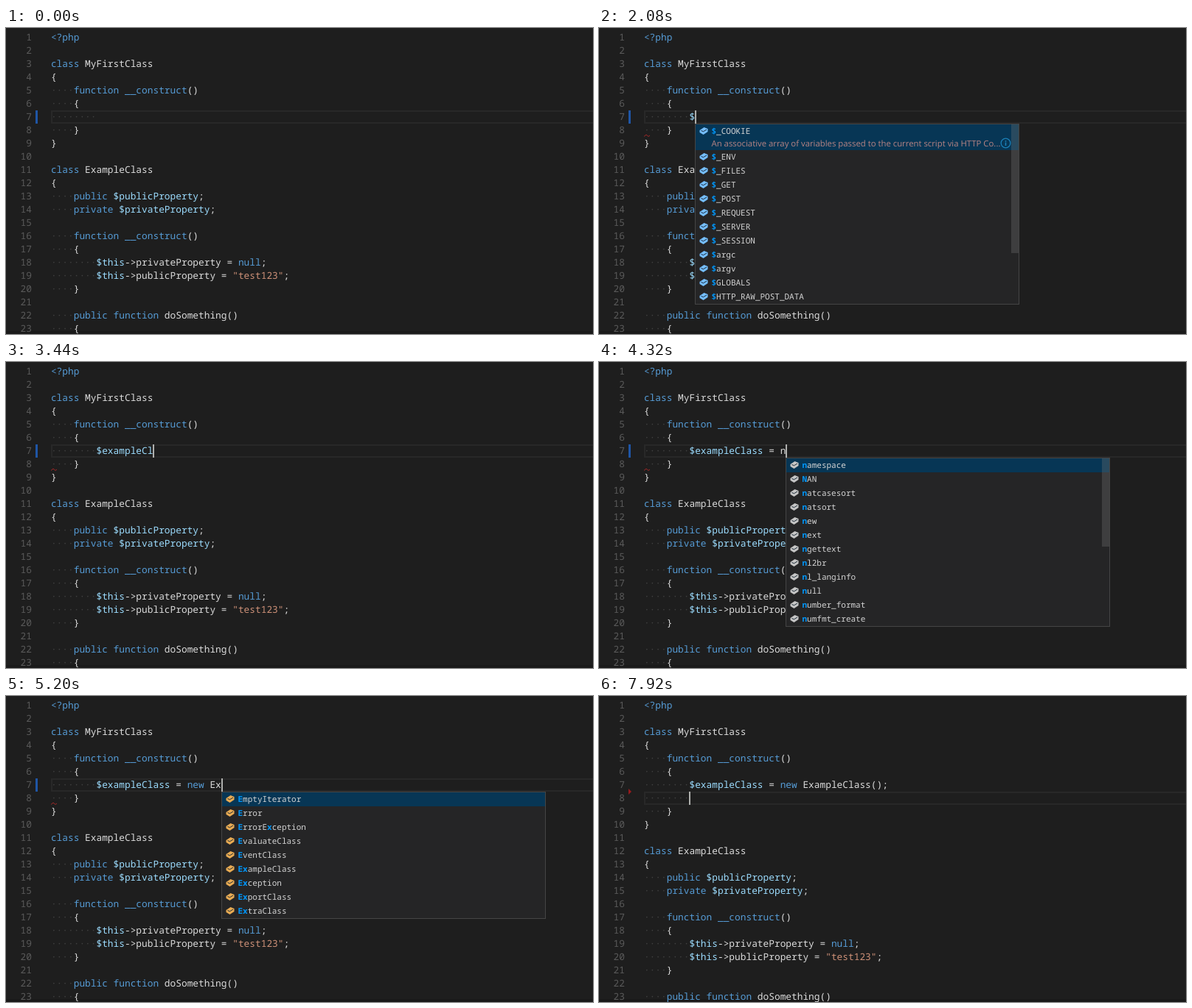
Recreate the animation shown at these times as an HTML page with a canvas. Size 796 by 416 pixels, loop 8000 ms.

```html
<!DOCTYPE html>
<html lang="en">
<head>
<meta charset="utf-8">
<title>Code completion</title>
<style>
  html, body { margin: 0; width: 100%; height: 100%; overflow: hidden; background: #1e1e1e; }
  canvas { display: block; }
</style>
</head>
<body>
<canvas id="stage" width="796" height="416"></canvas>
<script>
const ctx = document.getElementById('stage').getContext('2d');
const LOOP = 8000;
const LEFT = 60.9, CHAR = 7.697, LINE = 18, TOP = 4;
const MONO = '"Noto Sans Mono", "DejaVu Sans Mono", monospace';
const CODE = '12.83px ' + MONO;
const LABEL = '11px ' + MONO, LABEL_CHAR = 6.6;
const DOC = '11.35px "Open Sans", "Noto Sans", sans-serif';
const PLAIN = '#dcdcdc', KEYWORD = '#569cd6', VARIABLE = '#9cdcfe', STRING = '#ce9178';

const before = `<?php

class MyFirstClass
{
    function __construct()
    {`.split('\n');
const after = `    }
}

class ExampleClass
{
    public $publicProperty;
    private $privateProperty;

    function __construct()
    {
        $this->privateProperty = null;
        $this->publicProperty = "test123";
    }

    public function doSomething()
    {`.split('\n');
const typed = '$exampleClass = new ExampleClass();';

const lists = {
  vars: {
    icon: '#75beff', slider: 175,
    doc: 'An associative array of variables passed to the current script via HTTP Co...',
    items: ('$_COOKIE $_ENV $_FILES $_GET $_POST $_REQUEST $_SERVER $_SESSION ' +
      '$argc $argv $GLOBALS $HTTP_RAW_POST_DATA').split(' ')
  },
  env: {
    icon: '#75beff', items: ['$_ENV'],
    doc: 'An associative array of variables passed to the current script via the env...'
  },
  n: {
    icon: '#c5c5c5', slider: 120,
    items: ('namespace NAN natcasesort natsort new next ngettext nl2br ' +
      'nl_langinfo null number_format numfmt_create').split(' ')
  },
  ne: { icon: '#c5c5c5', items: ['new', 'next'] },
  new: { icon: '#c5c5c5', items: ['new'] },
  classes: {
    icon: '#e8ab53',
    items: ('EmptyIterator Error ErrorException EvaluateClass EventClass ' +
      'ExampleClass Exception ExportClass ExtraClass').split(' ')
  },
  example: { icon: '#e8ab53', items: ['ExampleClass'] }
};

// start time, characters typed, cursor visible, open list
const steps = [
  [0, 0, 0], [240, 0, 1], [720, 0, 0],
  [1120, 1, 1, 'vars'], [1360, 2, 1, 'vars'], [1440, 3, 1, 'env'], [1920, 2, 1, 'env'],
  [2080, 1, 1, 'vars'], [2160, 2, 1, 'vars'], [2240, 2, 1, 'env'],
  [2400, 3, 1], [2480, 4, 1], [2560, 5, 1],
  [2800, 6, 1], [2880, 7, 1], [2960, 8, 1], [3280, 9, 1],
  [3440, 10, 1], [3520, 11, 1], [3600, 12, 1], [3760, 13, 1], [3840, 14, 1],
  [4000, 15, 1], [4080, 16, 1],
  [4320, 17, 1, 'n'], [4400, 18, 1, 'ne'], [4480, 19, 1, 'new'], [4560, 20, 1],
  [4800, 21, 1, 'classes'], [5200, 22, 1, 'classes'], [5280, 22, 1, 'example'],
  [5680, 22, 0, 'example'],
  [6080, 32, 1], [6560, 32, 0], [6720, 33, 1], [6800, 34, 1],
  [7040, 35, 1], [7520, 35, 0], [7920, 35, 1]
];

const colX = col => LEFT + col * CHAR;
const lineY = line => TOP + (line - 1) * LINE;

function rect(x, y, w, h, color) {
  ctx.fillStyle = color;
  ctx.fillRect(x, y, w, h);
}

function frame(x, y, w, h, color, width = 1) {
  ctx.strokeStyle = color;
  ctx.lineWidth = width;
  ctx.strokeRect(x + width / 2, y + width / 2, w - width, h - width);
}

function text(str, x, y, color, font = CODE, align = 'left') {
  ctx.font = font;
  ctx.textAlign = align;
  ctx.fillStyle = color;
  ctx.fillText(str, x, y);
}

function shape(points, color) {
  ctx.fillStyle = color;
  ctx.beginPath();
  points.forEach(([x, y]) => ctx.lineTo(x, y));
  ctx.fill();
}

function tokenColor(token) {
  if (token[0] === '"') return STRING;
  if (token[0] === '$') return VARIABLE;
  return /^(<\?php|class|function|__construct|public|private|null|new)$/.test(token) ? KEYWORD : PLAIN;
}

function drawLine(str, line) {
  const y = lineY(line) + 13;
  for (const { 0: run, index } of str.matchAll(/^ +| +$/g))
    for (let i = 0; i < run.length; i++) text('·', colX(index + i), y, '#414141');
  for (const { 0: token, index } of str.matchAll(/"[^"]*"|<\?php|\$\w*|\w+|[^\s\w$"]+/g))
    text(token, colX(index), y, tokenColor(token));
}

function drawSquiggle(x, y) {
  ctx.strokeStyle = '#a02828';
  ctx.lineWidth = 1;
  ctx.beginPath();
  ctx.moveTo(x, y + 2.5);
  ctx.lineTo(x + 3, y);
  ctx.lineTo(x + 6, y + 2.5);
  ctx.lineTo(x + 8, y + 1);
  ctx.stroke();
}

function drawIcon(x, y, color) {
  shape([[x, y - 1], [x + 6, y - 5], [x + 11, y - 3], [x + 11, y + 1], [x + 5, y + 5], [x, y + 2]], color);
  ctx.strokeStyle = '#1e2c38';
  ctx.lineWidth = 1;
  ctx.beginPath();
  ctx.moveTo(x + 2, y - 0.5);
  ctx.lineTo(x + 5, y + 0.8);
  ctx.lineTo(x + 9.5, y - 2);
  ctx.stroke();
}

function drawInfo(x, y) {
  ctx.strokeStyle = '#1b80b8';
  ctx.lineWidth = 1.3;
  ctx.beginPath();
  ctx.arc(x, y, 6.3, 0, 7);
  ctx.stroke();
  rect(x - 0.8, y - 3.5, 1.6, 1.6, '#1b80b8');
  rect(x - 0.8, y - 1, 1.6, 4.5, '#1b80b8');
}

// Letters of the query are picked out in order within the label.
function drawLabel(label, query, x, y) {
  let hit = 0;
  [...label].forEach((ch, i) => {
    const match = hit < query.length && ch.toLowerCase() === query[hit].toLowerCase();
    if (match) hit++;
    text(ch, x + i * LABEL_CHAR, y, match ? '#0097fb' : '#d4d4d4', (match ? 'bold ' : '') + LABEL);
  });
}

function drawList({ items, doc, icon, slider }, query, x, y) {
  const first = doc ? 35 : 19;
  const height = first + (items.length - 1) * 19 + 2;
  rect(x, y, 440, height, '#252526');
  rect(x + 1, y + 1, 438, first, '#073655');
  items.forEach((label, i) => {
    const mid = y + 10 + (i ? first + (i - 1) * 19 : 0);
    drawIcon(x + 6.5, mid, icon);
    drawLabel(label, query, x + 22.5, mid + 4);
  });
  if (doc) {
    text(doc, x + 22.5, y + 31, '#b88484', DOC);
    drawInfo(x + 421.5, y + 26.5);
  }
  if (slider) rect(x + 429, y + 1, 10, slider, 'rgba(121,121,121,.3)');
  frame(x, y, 440, height, '#454545');
}

function draw(t) {
  const [, count, cursor, list] = steps.findLast(step => step[0] <= t);
  const newline = t >= 7920;
  const row = newline ? 8 : 7;
  const col = 8 + (newline ? 0 : count);
  const indent = ' '.repeat(8);
  // The closing bracket is inserted together with the opening one.
  const entry = typed.slice(0, count === 33 ? 34 : count);
  const lines = [...before, indent + entry, ...(newline ? [indent] : []), ...after];

  rect(0, 0, 796, 416, '#1e1e1e');
  rect(0, 412, 796, 4, '#1a1a1a');
  frame(61, lineY(row), 760, LINE, '#282828', 2);

  if (t < 7360) rect(40, lineY(7), 3, LINE, '#1f55a5');
  else shape([[40, 126], [44, 130], [40, 134]], '#971a1d');

  if (count === 33 || count === 34)
    for (const c of [40, 41]) frame(Math.round(colX(c)), lineY(7), 8, LINE, '#777');

  lines.slice(0, 23).forEach((str, i) => {
    text(i + 1, 35, lineY(i + 1) + 13, '#5a5a5a', CODE, 'right');
    drawLine(str, i + 1);
  });

  if (t >= 1440 && t < 7280) drawSquiggle(61, 145);

  const x = Math.round(colX(col));
  if (cursor) rect(x, lineY(row), 2, LINE, '#aeafad');
  if (list) drawList(lists[list], entry.match(/[$\w]*$/)[0], x, lineY(8));
}

ctx.textRendering = 'geometricPrecision';
const start = performance.now();
function tick() {
  draw((performance.now() - start) % LOOP);
  requestAnimationFrame(tick);
}
tick();
</script>
</body>
</html>
```
